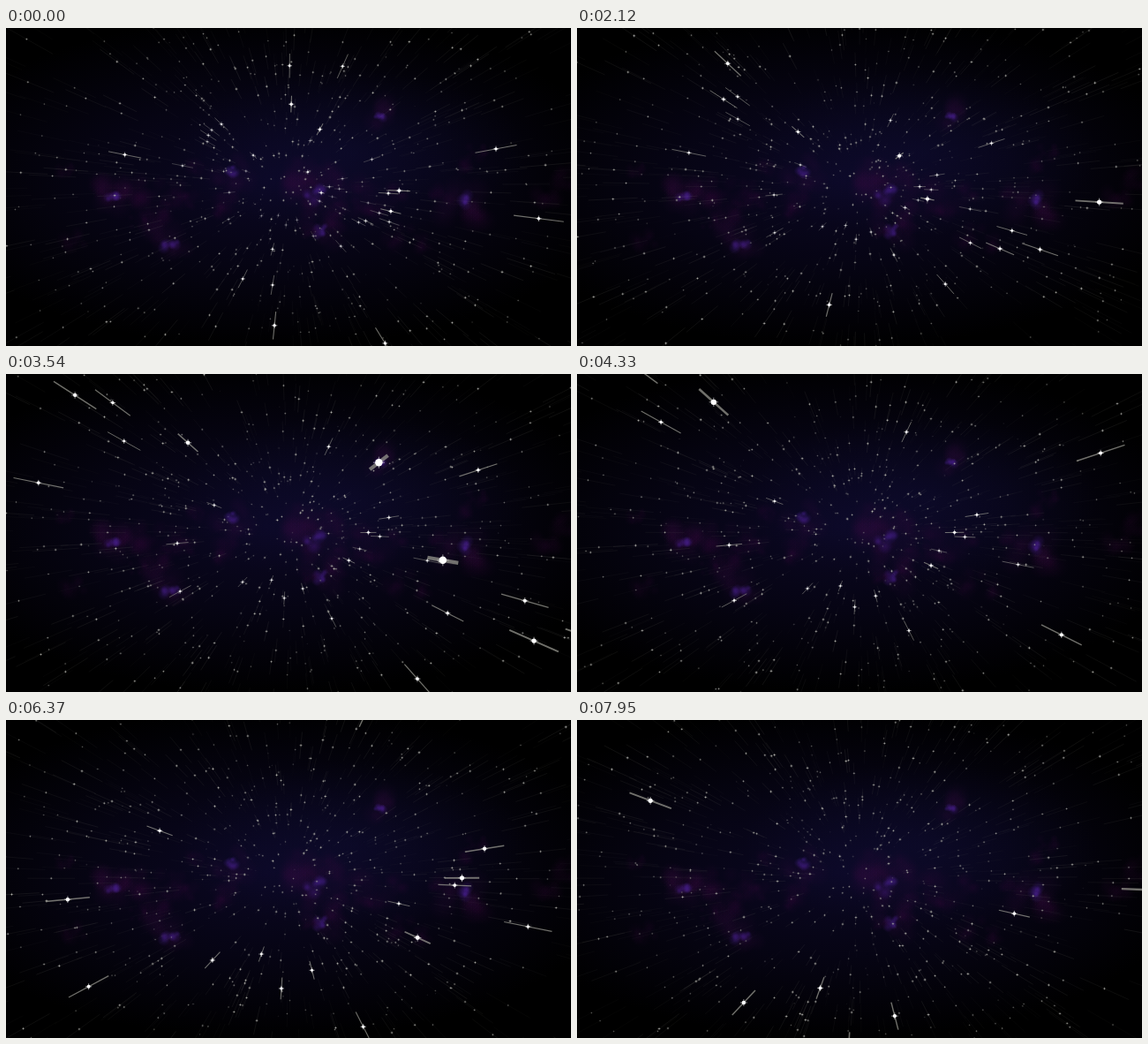
Write an HTML page with a canvas that moves like this. It is 640 by 360 pixels and loops after 8000 ms.

```html
<!DOCTYPE html>
<html lang="en">
<head>
<meta charset="utf-8">
<title>Starfield</title>
<style>
  html, body { margin: 0; width: 100%; height: 100%; overflow: hidden; background: #000; }
  canvas { display: block; width: 640px; height: 360px; }
</style>
</head>
<body>
<canvas id="sky" width="640" height="360"></canvas>
<script>
const W = 640, H = 360, CX = 320, CY = 180, LOOP = 8000;
const UNIT = 3000, NEAR = 1500, DEPTH = 15500;
const ctx = document.getElementById('sky').getContext('2d');

let seed = 4711;
function rand() {
  seed = (seed * 1664525 + 1013904223) >>> 0;
  return seed / 4294967296;
}
const spread = r => (rand() * 2 - 1) * r;
const soft = r => spread(r / 2) + spread(r / 2);
const clamp = (v, a, b) => Math.max(a, Math.min(b, v));
const many = (n, make) => Array.from({ length: n }, make);

// Leading stars: offset from the centre at depth UNIT, then starting depth.
const leaders = [
  [50, -39, 6876], [85, 15, 6869], [230, 101, 7892], [256, 129, 9672],
  [-259, 24, 11578], [-203, -76, 12645], [171, -1, 11082],
  [-134, 143, 13139], [-262, -169, 8660], [152, 5, 3641]
].map(([x, y, z]) => ({ x, y, z }));

const others = many(34, () => {
  const a = rand() * Math.PI * 2, r = 150 + 300 * rand();
  return { x: r * Math.cos(a), y: r * 0.7 * Math.sin(a), z: 3500 + 11000 * rand() };
});
const bright = leaders.concat(others);

// Faint stars fill a box that wraps in depth.
const faint = many(1000, () => (
  { x: soft(1500), y: soft(1050), z: rand() * DEPTH, glow: 0.25 + 0.65 * rand() ** 2 }
));

function blob(g, x, y, r, rgb, alpha) {
  const fill = g.createRadialGradient(x, y, 0, x, y, r);
  fill.addColorStop(0, `rgba(${rgb},${alpha})`);
  fill.addColorStop(0.5, `rgba(${rgb},${alpha * 0.55})`);
  fill.addColorStop(1, `rgba(${rgb},0)`);
  g.fillStyle = fill;
  g.fillRect(x - r, y - r, 2 * r, 2 * r);
}

function cloud(g, x, y, r, rgb, alpha) {
  for (let i = 0; i < 8; i++) {
    blob(g, x + spread(r), y + spread(r * 0.8), r * (0.4 + 0.6 * rand()), rgb, alpha);
  }
}

function paintNebula() {
  const layer = document.createElement('canvas');
  layer.width = W;
  layer.height = H;
  const g = layer.getContext('2d');
  g.fillRect(0, 0, W, H);

  // Wide blue haze
  g.save();
  g.scale(1, 0.47);
  blob(g, 300, 370, 400, '26,18,84', 0.42);
  blob(g, 390, 300, 200, '26,24,90', 0.2);
  g.restore();

  // Purple wisps along the band
  for (let i = 0; i < 34; i++) {
    cloud(g, rand() * W, 198 + soft(75), 8 + 12 * rand(), '58,8,62', 0.09);
  }

  // Violet cores
  const cores = [
    [120, 190, 7], [186, 244, 8], [256, 163, 7], [350, 188, 10],
    [358, 229, 7], [424, 97, 6], [516, 195, 8]
  ];
  for (const [x, y, r] of cores) {
    cloud(g, x, y, r * 2.6, '64,12,72', 0.12);
    cloud(g, x, y, r, '88,38,176', 0.26);
  }
  return layer;
}
const nebula = paintNebula();

// Distance flown: fast at first, settling to a steady speed.
const travel = t => t + 2132 * Math.tanh(t / 2600);

function project(s, z) {
  const k = UNIT / z, x = s.x * k, y = s.y * k;
  return Math.abs(x) < 365 && Math.abs(y) < 210 ? [x, y] : null;
}

function streak(x, y, width, color) {
  ctx.strokeStyle = color;
  ctx.lineWidth = width;
  ctx.beginPath();
  ctx.moveTo(CX + x * 0.9, CY + y * 0.9);
  ctx.lineTo(CX + x * 1.1, CY + y * 1.1);
  ctx.stroke();
}

function cross(x, y, arm, color) {
  ctx.fillStyle = color;
  ctx.fillRect(CX + x - arm, CY + y - 0.5, arm * 2, 1);
  ctx.fillRect(CX + x - 0.5, CY + y - arm, 1, arm * 2);
}

function drawFaint(s, d) {
  const z = NEAR + (((s.z - d) % DEPTH) + DEPTH) % DEPTH;
  const p = project(s, z);
  if (!p) return;
  const [x, y] = p;
  const a = s.glow * clamp((NEAR + DEPTH - z) / 2500, 0, 1);
  streak(x, y, 0.8, `rgba(120,120,112,${a * 0.2})`);
  cross(x, y, 1 + s.glow * 0.8, `rgba(135,135,130,${a * 0.65})`);
  ctx.fillStyle = `rgba(205,205,200,${a * 0.9})`;
  ctx.fillRect(CX + x - 0.6, CY + y - 0.6, 1.2, 1.2);
}

function drawBright(s, d) {
  const z = s.z - d;
  const p = z > 150 && project(s, z);
  if (!p) return;
  const [x, y] = p;
  const a = clamp(1.35 - z / 13000, 0.3, 1);
  const r = Math.min(0.4 + 5600 / z, 6);
  streak(x, y, Math.min(6, 0.7 + 7.5e6 / (z * z)), `rgba(150,150,142,${a * 0.75})`);
  cross(x, y, r * 1.3 + 1, `rgba(205,205,205,${a * 0.7})`);
  ctx.fillStyle = `rgba(255,255,255,${a})`;
  ctx.beginPath();
  ctx.arc(CX + x, CY + y, r, 0, Math.PI * 2);
  ctx.fill();
}

function render(t) {
  const d = travel(t);
  ctx.drawImage(nebula, 0, 0);
  for (const s of faint) drawFaint(s, d);
  for (const s of bright) drawBright(s, d);
}

const start = performance.now();
function tick() {
  render((performance.now() - start) % LOOP);
  requestAnimationFrame(tick);
}
tick();
</script>
</body>
</html>
```
